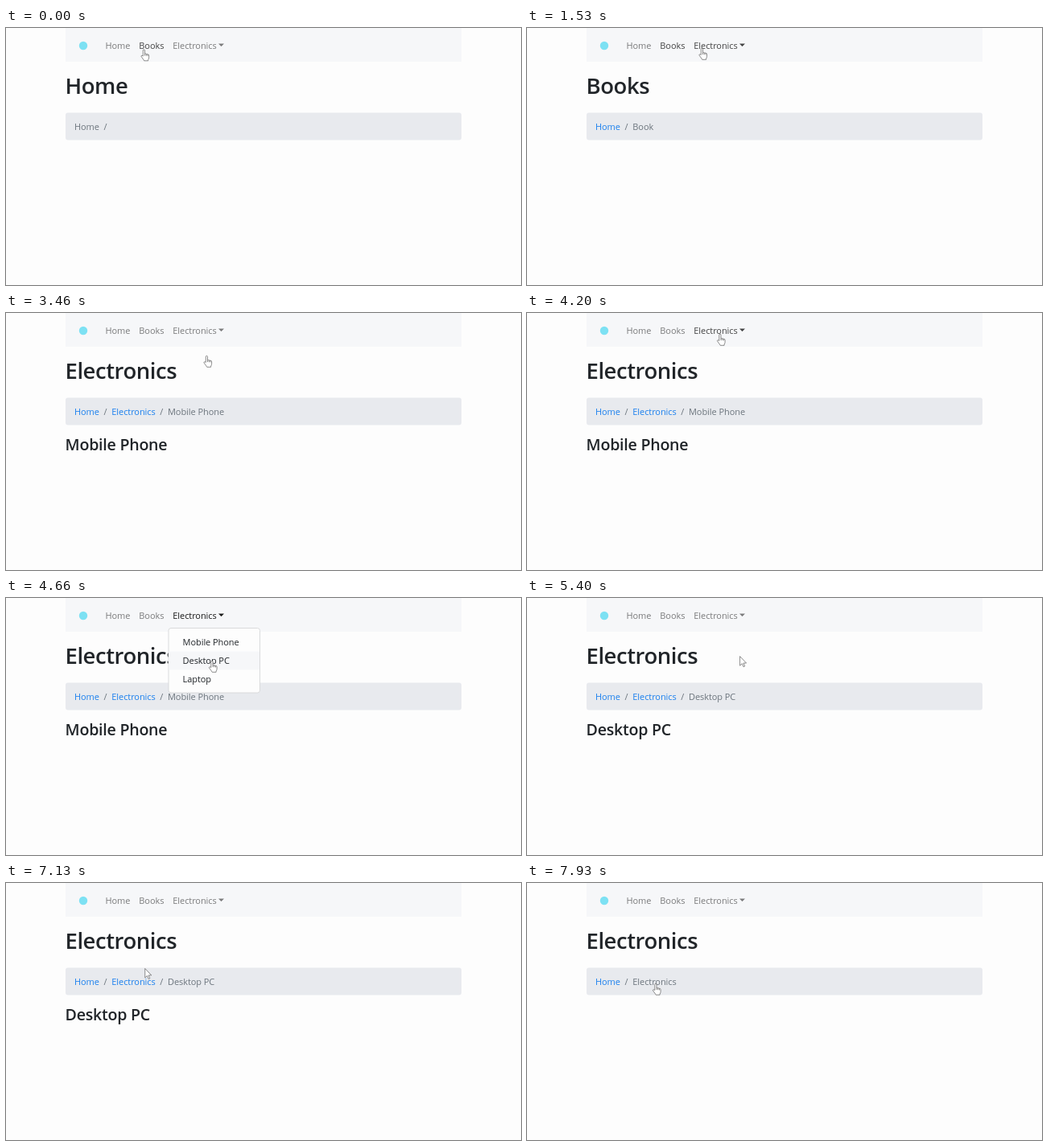
An HTML page for the animation above (8000 ms loop, 640 px wide and 320 px high).

```html
<!DOCTYPE html>
<html lang="en">
<head>
<meta charset="utf-8">
<title>Breadcrumb navigation</title>
<style>
  html, body { margin: 0; width: 100%; height: 100%; overflow: hidden; background: #fdfdfd; }
  svg { display: block; width: 640px; height: 320px; }
  text { font: 11px "Open Sans", "Noto Sans", sans-serif; letter-spacing: -.07px; fill: #212529; white-space: pre; }
  .title { font-size: 27.5px; font-weight: 600; letter-spacing: -.45px; }
  .sub { font-size: 19.6px; font-weight: 600; letter-spacing: -.25px; }
  .crumb { fill: #6c757d; }
  .link { fill: #1b80ee; }
  .link.hover { fill: #0056b3; text-decoration: underline; }
  .nav text, .nav path { fill: #000; }
  .cursor path { fill: #fff; stroke: #5c5c5c; stroke-width: .7; stroke-linejoin: round; }
</style>
</head>
<body>
<svg viewBox="0 0 640 320">
  <rect x="74" y="-4" width="492" height="46" fill="#f6f7f9"/>
  <circle cx="96" cy="22" r="5.2" fill="#7de1f3"/>
  <g class="nav">
    <g id="navHome"><text x="123.4" y="26">Home</text></g>
    <g id="navBooks"><text x="165.3" y="26">Books</text></g>
    <g id="navElectronics"><text x="207.3" y="26">Electronics</text><path d="M264 19.6h7l-3.5 3.5z"/></g>
  </g>
  <text id="title" class="title" x="73.5" y="82"></text>
  <rect x="74" y="105.5" width="492" height="34" rx="3" fill="#e8eaee"/>
  <text id="crumb0" class="crumb" x="84.9" y="127">Home</text>
  <text class="crumb" x="121.5" y="127">/</text>
  <text id="crumb1" class="crumb" x="131.3" y="127"></text>
  <text id="slash" class="crumb" x="191.2" y="127">/</text>
  <text id="crumb2" class="crumb" x="201" y="127"></text>
  <text id="sub" class="sub" x="73.6" y="170.5"></text>
  <g id="menu">
    <rect x="202" y="37.5" width="113.5" height="80.5" rx="3" fill="#fdfdfd" stroke="#d6d7d9" stroke-width=".9"/>
    <rect id="highlight" x="202.5" width="112.5" height="22.8" fill="#f6f7f9"/>
    <text x="219.6" y="59.1">Mobile Phone</text>
    <text x="219.6" y="82">Desktop PC</text>
    <text x="219.6" y="104.9">Laptop</text>
  </g>
  <g id="cursor" class="cursor">
    <path id="hand" transform="translate(0 -.7)" d="M-1.2 8.2V1.2a1.1 1.1 0 0 1 2.2 0V5.4q1-.7 1.8.3q1.1-.5 1.7.4q1.5-.3 1.6 1.3V10q-.1 1.6-1 2.8V14H.2q-1-2-3.2-4.6q-1-1.2-.2-1.8q1-.4 2 .6zM1 5.4v2.4M2.8 5.7v2.2M4.5 6.1v2"/>
    <path id="arrow" d="M0 0V11.5L2.7 9l1.7 4 1.7-.7L4.4 8.4H8z"/>
  </g>
</svg>
<script>
const LOOP = 8000;
const $ = id => document.getElementById(id);

// Page states: start time, title, second crumb, sub page, menu open
const states = [
  [0, "Home", "", "", false],
  [970, "Books", "Book", "", false],
  [1950, "Electronics", "Electronics", "", true],
  [2760, "Electronics", "Electronics", "Mobile Phone", false],
  [4400, "Electronics", "Electronics", "Mobile Phone", true],
  [4950, "Electronics", "Electronics", "Desktop PC", false],
  [7500, "Electronics", "Electronics", "", false]
];

// Cursor tip: time, x, y
const path = [
  [0, 171.5, 27.5], [60, 171.5, 27.5], [130, 172.2, 27.3], [330, 172.2, 27.3],
  [660, 176, 27], [1080, 176, 27], [1530, 217.5, 26], [1750, 226, 25],
  [2000, 228, 25], [2500, 249.5, 54], [3530, 249.5, 54], [4000, 240, 27],
  [4400, 240, 27], [4660, 256, 79], [5260, 256, 79], [5600, 279, 62],
  [6000, 244, 27], [6460, 232, 23], [6700, 226, 25], [7300, 160, 126], [LOOP, 160, 126]
];

const inside = ([x, y], left, top, right, bottom) => x >= left && x <= right && y >= top && y <= bottom;
const show = (el, on) => el.style.display = on ? "" : "none";

function tipAt(t) {
  const i = path.findIndex(p => p[0] > t);
  const [t0, x0, y0] = path[i - 1], [t1, x1, y1] = path[i];
  const u = (t - t0) / (t1 - t0), e = u * u * (3 - 2 * u);
  return [x0 + (x1 - x0) * e, y0 + (y1 - y0) * e];
}

function render(t) {
  const [, title, crumb, sub, open] = states.findLast(s => s[0] <= t);
  const tip = tipAt(t);
  const overHome = inside(tip, 119, 8, 159, 36);
  const overBooks = inside(tip, 160, 8, 201, 36);
  const overElectronics = inside(tip, 202, 8, 276, 36);
  const overCrumb = !!sub && inside(tip, 131, 116, 186, 130);

  $("title").textContent = title;
  $("crumb1").textContent = crumb;
  $("crumb2").textContent = $("sub").textContent = sub;
  $("crumb0").classList.toggle("link", !!crumb);
  $("crumb1").classList.toggle("link", !!sub);
  $("crumb1").classList.toggle("hover", overCrumb);
  show($("slash"), sub);

  $("navHome").style.opacity = overHome ? .7 : .5;
  $("navBooks").style.opacity = overBooks || title === "Books" ? .73 : .5;
  $("navElectronics").style.opacity = open ? .9 : overElectronics ? .73 : .5;

  show($("menu"), open);
  const item = Math.floor((tip[1] - 43.8) / 22.8);
  show($("highlight"), item >= 0 && item < 3);
  $("highlight").setAttribute("y", 43.8 + item * 22.8);

  // The hand stays after a click until the mouse moves again
  const resting = (t >= 2760 && t <= 3530) || (t >= 4950 && t <= 5260) || t >= 7500;
  const hand = resting || open || overHome || overBooks || overElectronics || overCrumb;
  show($("hand"), hand);
  show($("arrow"), !hand);
  $("cursor").setAttribute("transform", `translate(${tip})`);
}

const start = performance.now();
function tick() {
  render((performance.now() - start) % LOOP);
  requestAnimationFrame(tick);
}
tick();
</script>
</body>
</html>
```
